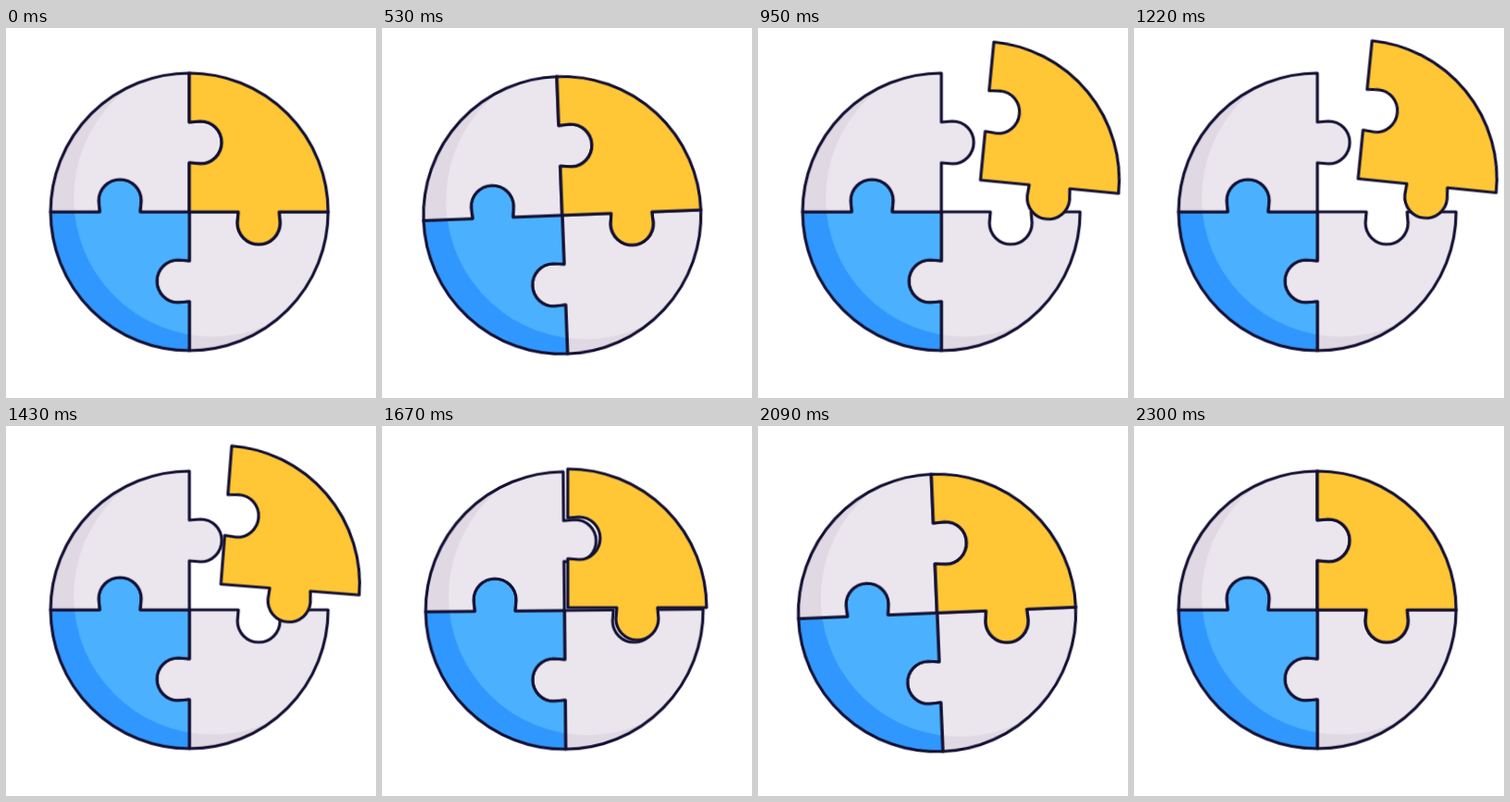
Write an HTML page that moves like this. It is 400 px wide and 400 px high and loops after 2330 ms.

```html
<!DOCTYPE html>
<html lang="en">
<head>
<meta charset="utf-8">
<title>Puzzle circle</title>
<style>
  html, body { margin: 0; width: 100%; height: 100%; overflow: hidden; background: #fff; }
  svg { display: block; width: 100vw; height: 100vh; }
  .line { fill: none; stroke: #131034; stroke-width: 3.2; stroke-linejoin: round; }
</style>
</head>
<body>
<svg viewBox="0 0 400 400">
  <defs>
    <path id="piece" d="M0 0V-53L12 -52A23 23 0 0 0 12 -98L0 -97V-150A150 150 0 0 1 150 0H97L98 12A23 23 0 0 1 52 12L53 0Z"/>
    <clipPath id="inside"><use href="#piece"/></clipPath>
  </defs>
  <g transform="translate(198.2 198.7)">
    <g id="wheel">
      <g id="fixed"></g>
      <g id="loose">
        <use href="#piece" fill="#ffc636"/>
        <use href="#piece" class="line"/>
      </g>
    </g>
  </g>
</svg>
<script>
const LOOP = 2330, STEP = 30, START = 500;
const $ = id => document.getElementById(id);

// Quarter piece turned by `angle`, with a crescent shade on the lower left of the disc
const quarter = (angle, light, shade) => `
  <g transform="rotate(${angle})">
    <use href="#piece" fill="${shade}"/>
    <g clip-path="url(#inside)">
      <circle r="150" fill="${light}" transform="rotate(${-angle}) translate(25 -15)"/>
    </g>
    <use href="#piece" class="line"/>
  </g>`;

$('fixed').innerHTML =
  quarter(90, '#ebe6ed', '#e0d8e2') +
  quarter(180, '#4bb1fe', '#3097fe') +
  quarter(270, '#ebe6ed', '#e0d8e2');

const sineOut = 'cubic-bezier(.39,.575,.565,1)';
const sineInOut = 'cubic-bezier(.37,0,.63,1)';
const fling = 'cubic-bezier(.3,0,.15,1)';
const fall = 'cubic-bezier(.333,0,.667,.2)';

// Rows: time, x, y, degrees, easing towards the next row
const move = (id, rows) => {
  const frames = rows.map(([t, x, y, deg, easing = 'linear']) => ({
    offset: t / LOOP,
    transform: `translate(${x}px, ${y}px) rotate(${deg}deg)`,
    easing
  }));
  const anim = $(id).animate(frames, { duration: LOOP, iterations: Infinity });
  anim.pause();
  return anim;
};

const anims = [
  move('wheel', [
    [0, 0, 0, 0],
    [500, 0, 0, 0, sineOut],
    [650, -11, 12, -7.2, sineInOut],
    [880, 0, 0, 0],
    [1664, 0, 0, 0, sineOut],
    [1830, -18.5, 13.2, -9.6, sineInOut],
    [2220, 0, 0, 0],
    [2330, 0, 0, 0]
  ]),
  move('loose', [
    [0, 0, 0, 0],
    [650, 0, 0, 0, fling],
    [1090, 45, -36.5, 5.9],
    [1120, 45, -36.5, 5.9, fall],
    [1690, 0, 0, 0],
    [2330, 0, 0, 0]
  ])
];

function draw() {
  const t = performance.now() % LOOP;
  const time = START + Math.max(0, Math.floor((t - START) / STEP)) * STEP;
  for (const a of anims) a.currentTime = time;
  requestAnimationFrame(draw);
}
draw();
</script>
</body>
</html>
```
